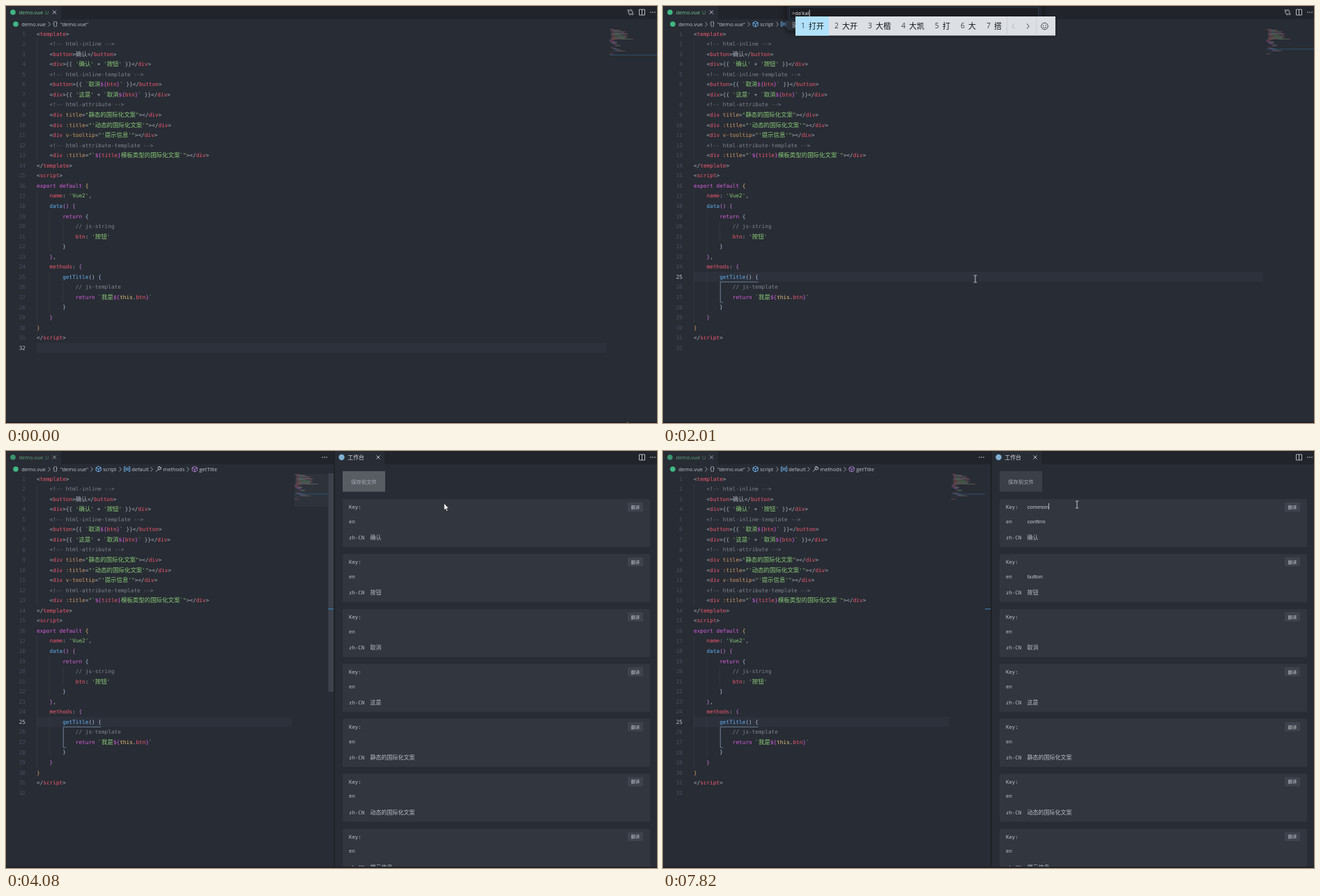
An HTML page for the animation above (8 s loop, 934x599 px).

```html
<!DOCTYPE html>
<html lang="zh-CN">
<head>
<meta charset="utf-8">
<title>demo.vue</title>
<style>
html, body { margin: 0; width: 100%; height: 100%; overflow: hidden; background: #282c34; }
svg { display: block; width: 100%; height: 100%; }
text { white-space: pre; }
.code { font: 7.72px "DejaVu Sans Mono", monospace; }
.code .c { font-size: 8.46px; }
.ui { font: 7.45px "Open Sans", "Noto Sans", sans-serif; }
.ui .c { font-size: 7.9px; }
.brace { font: 9px "Open Sans", "Noto Sans", sans-serif; }
.key { font: 6.3px "Open Sans", "Noto Sans", sans-serif; }
.form { font: 7.35px "DejaVu Sans Mono", monospace; }
.form .c { font-size: 8px; }
.field { font: 7.86px "Liberation Sans", Arial, sans-serif; }
.btn .c { font-size: 7.3px; }
.mini .c { font-size: 6.2px; }
.ime { font: 10.4px "Open Sans", "Noto Sans", sans-serif; }
.ime .c { font-size: 11px; }
.c { font-family: "Noto Sans CJK SC", "Noto Sans CJK", sans-serif; }
</style>
</head>
<body>
<svg id="stage" viewBox="0 0 934 599" preserveAspectRatio="none"></svg>
<script>
const LOOP = 8000, ROW = 14.55, ADV = 4.65, WIDE = 8.46;
const CJK = /([\u3000-\u9fff]+)/;
const INK = {
  w: '#abb2bf', r: '#ef596f', p: '#d55fde', g: '#89ca78', b: '#61afef',
  o: '#d19a66', c: '#7f848e', y: '#e5c07b', v: '#c678dd', l: '#a9bcd8'
};
const stage = document.getElementById('stage');

function el(parent, tag, attrs = {}) {
  const n = document.createElementNS('http://www.w3.org/2000/svg', tag);
  for (const k in attrs) n.setAttribute(k, attrs[k]);
  parent.append(n);
  return n;
}
const set = (n, attrs) => { for (const k in attrs) n.setAttribute(k, attrs[k]); };
const show = (n, on) => n.setAttribute('visibility', on ? 'inherit' : 'hidden');
const group = (parent, x = 0, y = 0) => el(parent, 'g', { transform: `translate(${x} ${y})` });
const rect = (parent, x, y, width, height, fill, more) => el(parent, 'rect', { x, y, width, height, fill, ...more });
const line = (parent, d, stroke, w = 0.8, more) => el(parent, 'path', { d, stroke, 'stroke-width': w, fill: 'none', ...more });
const ring = (parent, cx, cy, r, stroke, w, more) => el(parent, 'circle', { cx, cy, r, fill: 'none', stroke, 'stroke-width': w, ...more });

// Latin and CJK runs use different fonts and sizes
function fill(node, str, color) {
  str.split(CJK).forEach((s, i) => {
    if (!s) return;
    const run = el(node, 'tspan', i % 2 ? { class: 'c' } : {});
    if (color) run.setAttribute('fill', color);
    run.textContent = s;
  });
}
function label(parent, x, y, str, cls, color, more) {
  const n = el(parent, 'text', { x, y: y + 2.7, class: cls, fill: color, ...more });
  fill(n, str);
  return n;
}
function setText(n, str) {
  if (n.shown === str) return;
  n.shown = str;
  n.replaceChildren();
  fill(n, str);
}

const source = [
  '0|w<|rtemplate|w>',
  '1|c<!-- html-inline -->',
  '1|w<|rbutton|w>确认</|rbutton|w>',
  "1|w<|rdiv|w>{{ |g'确认'|w + |g'按钮'|w }}</|rdiv|w>",
  '1|c<!-- html-inline-template -->',
  '1|w<|rbutton|w>{{ |g`取消|p${|rbtn|p}|g`|w }}</|rbutton|w>',
  "1|w<|rdiv|w>{{ |g'这是'|w + |g`取消|p${|rbtn|p}|g`|w }}</|rdiv|w>",
  '1|c<!-- html-attribute -->',
  '1|w<|rdiv |otitle|w=|g"静态的国际化文案"|w></|rdiv|w>',
  '1|w<|rdiv |o:title|w=|g"\'动态的国际化文案\'"|w></|rdiv|w>',
  '1|w<|rdiv |ov-tooltip|w=|g"\'提示信息\'"|w></|rdiv|w>',
  '1|c<!-- html-attribute-template -->',
  '1|w<|rdiv |o:title|w=|g"`|p${|rtitle|p}|g模板类型的国际化文案`"|w></|rdiv|w>',
  '0|w</|rtemplate|w>',
  '0|w<|rscript|w>',
  '0|pexport default |y{',
  "1|rname|w: |g'Vue2'|w,",
  '1|bdata|v() {',
  '2|preturn |l{',
  '3|c// js-string',
  "3|rbtn|w: |g'按钮'",
  '2|l}',
  '1|v}|w,',
  '1|rmethods|w: |v{',
  '2|bgetTitle|l() {',
  '3|c// js-template',
  '3|preturn |g`我是|p${|ythis|w.|rbtn|p}|g`',
  '2|l}',
  '1|v}',
  '0|o}',
  '0|w</|rscript|w>',
  '0|w'
];
const rowY = i => 40 + ROW * i;

// editor
rect(stage, 0, 0, 934, 599, '#282c34');
rect(stage, 79, 0, 855, 19, '#21252b');
const current = rect(stage, 44, 0, 817, ROW, '#2c313c');
const matches = group(stage);
rect(matches, 132, 382.4, 5, 13.6, '#515a6b');
rect(matches, 81, 426, 5, 13.6, '#515a6b');
const code = group(stage), map = group(stage), numbers = [];
const slider = rect(map, 0, 0, 48, 47, '#abb2bf');
source.forEach((src, i) => {
  const [depth, ...parts] = src.split('|'), y = rowY(i), x0 = 44 + depth * 4 * ADV;
  numbers.push(label(code, 28, y, String(i + 1), 'code', '', { 'text-anchor': 'end' }));
  for (let d = 0; d < depth; d++) rect(code, 44 + d * 4 * ADV, y - ROW / 2, 0.6, ROW, '#3b4048');
  const text = el(code, 'text', { x: x0, y: y + 2.6, class: 'code' });
  let mx = depth * 4 * ADV;
  for (const p of parts) {
    const s = p.slice(1), color = INK[p[0]];
    fill(text, s, color);
    if (p[0] === 'c') text.setAttribute('font-style', 'italic');
    const w = [...s].reduce((a, ch) => a + (CJK.test(ch) ? WIDE : ADV), 0);
    if (w) rect(map, mx * 0.137, i * 1.19, w * 0.137, 0.7, color, { opacity: 0.5 });
    mx += w;
  }
});
const mapLine = rect(map, 0, 0, 68, 0.7, '#30618a');
const scope = line(stage, 'M136.5 396.4H82.4V426H86', '#8fa9c8', 0.6);
const caret = rect(stage, 136.7, 382.5, 1, 14, '#528bff');

// tab and breadcrumbs
const cross = (parent, x, y, color) => line(parent, `M${x - 2.5} ${y - 2.5}l5 5m0-5l-5 5`, color, 0.9);
const dots = (parent, x, y) => [-3, 0, 3].forEach(d => el(parent, 'circle', { cx: x + d, cy: y, r: 0.8, fill: '#c5c9d0' }));
const chevron = (parent, x) => line(parent, `M${x - 1.5} 23l3 3.2-3 3.2`, '#aeb5c2', 0.8);
const CUBE = 'M0-4L3.6-2V2L0 4L-3.6 2V-2ZM-3.6-2L0 0L3.6-2M0 0V4';
const FIELD = 'M-2-3.2H-4V3.2H-2M2-3.2H4V3.2H2M-1.8-1.3H1.8V1.3H-1.8Z';
const WRENCH = 'M-3.6 3.6L0.3-.3M3.7-2.4A2.3 2.3 0 1 1 1.9-3.7L1.6-2L3.7-2.4';
const icon = (parent, x, y, d, color) => line(parent, d, color, 0.9, { transform: `translate(${x} ${y})` });
const CRUMB = '#bfc4ce';

const tab = group(stage);
el(tab, 'circle', { cx: 10, cy: 9, r: 3.8, fill: '#41b883' });
label(tab, 18.5, 9.2, 'demo.vue', 'ui', '#73c991');
label(tab, 56, 9.2, 'U', 'ui', '#5da27c');
cross(tab, 69.5, 9, '#d7dae0');

el(stage, 'circle', { cx: 14, cy: 26, r: 3.8, fill: '#41b883' });
label(stage, 22.3, 26.2, 'demo.vue', 'ui', CRUMB);
chevron(stage, 62);
label(stage, 67.3, 26.2, '{}', 'brace', CRUMB);
label(stage, 78, 26.2, '"demo.vue"', 'ui', CRUMB);
const crumbs = group(stage);
[[123, 'script', CUBE, '#75beff'], [164, 'default', FIELD, '#75beff'],
 [209, 'methods', WRENCH, '#c5c9d0'], [261, 'getTitle', CUBE, '#b180d7']].forEach(([x, s, d, color]) => {
  chevron(crumbs, x);
  icon(crumbs, x + 9.7, 26, d, color);
  label(crumbs, x + 16.3, 26.2, s, 'ui', CRUMB);
});

const compare = group(stage, 896, 9);
line(compare, 'M-2.8-1.2V1.5Q-2.8 3 0 3M2.8 1.2V-1.5Q2.8-3 0-3M-1 1.5L.5 3L-1 4.5M1-4.5L-.5-3L1-1.5', '#c5c9d0', 0.8);
ring(compare, -2.8, -2.5, 1.2, '#c5c9d0', 0.8);
ring(compare, 2.8, 2.5, 1.2, '#c5c9d0', 0.8);

// workbench on the right
const bench = group(stage);
rect(bench, 472, 19, 462, 580, '#282c34');
rect(bench, 472, 0, 71, 19, '#282c34');
rect(bench, 470, 0, 2, 599, '#1e2127');
dots(bench, 457, 9);
el(bench, 'circle', { cx: 481.5, cy: 9, r: 4.2, fill: '#7fb0d3' });
label(bench, 490.3, 9.2, '工作台', 'ui', '#d7dae0');
cross(bench, 534, 9, '#d7dae0');
const scroll = rect(bench, 462.5, 32, 7.5, 314, '#8a95a8');
rect(bench, 462, 226.4, 8, 1.1, '#3d82b8');

const page = group(bench), hovers = [], answers = [];
rect(page, 483, 29, 61, 29.5, '#3b3f48');
const saveHover = rect(page, 483, 29, 61, 29.5, '#ffffff');
label(page, 513.5, 44, '保存到文件', 'ui btn', '#a9aeb7', { 'text-anchor': 'middle' });
['确认', '按钮', '取消', '这是', '静态的国际化文案', '动态的国际化文案', '提示信息'].forEach((word, i) => {
  const y = 69 + 78.95 * i;
  rect(page, 483, y, 441, 69, '#32363f', { rx: 1.5 });
  label(page, 492, y + 11.5, 'Key:', 'form', '#b9bec7');
  label(page, 492, y + 32, 'en', 'form', '#b9bec7');
  label(page, 492, y + 55.3, 'zh-CN', 'form', '#b9bec7');
  label(page, 522.5, y + 55.3, word, 'form', '#b9bec7');
  answers.push(label(page, 522.7, y + 32, '', 'field', '#c5c9d0'));
  rect(page, 892, y + 4.7, 22, 13.2, '#3e434d', { rx: 1 });
  hovers.push(rect(page, 892, y + 4.7, 22, 13.2, '#5c616a', { rx: 1 }));
  label(page, 903, y + 11, '翻译', 'ui mini', '#c0c4cc', { 'text-anchor': 'middle' });
});
const keyField = label(page, 522.7, 80, '', 'field', '#c5c9d0');
const keyCaret = rect(page, 523, 75, 0.8, 9, '#d7dae0');

line(stage, 'M908.5 5h8v8h-8zM912.5 5v8', '#c5c9d0', 0.9);
dots(stage, 928, 9);
rect(stage, 0, 597, 934, 2, '#1f2329');

// command palette
const palette = group(stage);
const panel = rect(palette, 177.5, -4, 366.5, 40, '#21252b', { style: 'filter:drop-shadow(0 1px 4px #0009)' });
rect(palette, 181.5, 2, 357, 16, '#1b1d23', { stroke: '#28405a', 'stroke-width': 0.7 });
const input = label(palette, 185, 10.3, '', 'ui', '#dfe2e7');
const inputCaret = rect(palette, 190, 5.5, 0.8, 9.5, '#e6e8ec');
rect(palette, 178, 20.5, 358, 13.4, '#2c313a');
const single = label(palette, 185, 27.3, '', 'ui', '#dfe2e7');

const list = group(palette);
const KEYW = { Ctrl: 16, Shift: 19, I: 8 };
function chord(y, keys) {
  let x = 531;
  keys.split(' ').reverse().forEach(combo => {
    combo.split('+').reverse().forEach((k, i) => {
      const w = KEYW[k] || 10.5;
      if (i) {
        label(list, x - 4.5, y, '+', 'key', '#c5c9d0', { 'text-anchor': 'middle' });
        x -= 9;
      }
      x -= w;
      rect(list, x, y - 5, w, 10, '#2c3038', { rx: 1.5 });
      label(list, x + w / 2, y - 0.3, k, 'key', '#dfe2e7', { 'text-anchor': 'middle' });
    });
    x -= 7;
  });
}
['打开翻译工作台', '开发人员: 重新加载窗口|Ctrl+R', '-Developer: Reload Window', '替换当前文档', '手动设置语言目录',
 'ESLint: Fix all auto-fixable Problems', '搜索: 在文件中替换|Ctrl+Shift+H', '-Search: Replace in Files',
 'VSCodeCounter: Count lines in directory', 'ESLint: Migrate Settings',
 '文件: 保存但不格式化|Ctrl+K Ctrl+Shift+S', '-File: Save without Formatting',
 '开发人员: 切换开发人员工具|Ctrl+Shift+I', '-Developer: Toggle Developer Tools',
 '"文件操作需要预览"的重置选项', '按降序排列行', '-Sort Lines Descending', '按升序排列行'].forEach((row, i) => {
  const y = 27.3 + 13.34 * i, [s, keys] = row.split('|'), sub = s[0] === '-';
  label(list, 185, y, sub ? s.slice(1) : s, 'ui', sub ? '#a4a8b0' : '#dfe2e7');
  if (keys) chord(y, keys);
});
rect(list, 178, 207.3, 366, 0.7, '#3e4452');
label(list, 499.5, 214.5, '其他命令', 'ui', '#3f9bf5');
rect(list, 536, 20.5, 6, 13.5, '#3a404b');
ring(list, 527.5, 27.3, 2.8, '#c5c9d0', 1);
ring(list, 527.5, 27.3, 3.9, '#c5c9d0', 1, { 'stroke-dasharray': '1.5 1.56' });
el(list, 'circle', { cx: 527.5, cy: 27.3, r: 1, fill: '#c5c9d0' });

// input method bar
const ime = group(stage);
function drawIme(words, x0) {
  if (ime.shown === words) return;
  ime.shown = words;
  ime.replaceChildren();
  if (!words) return;
  const items = words.split(' ');
  const width = w => 26 + 11 * w.length;
  const end = items.reduce((x, w) => x + width(w), x0);
  rect(ime, x0, 15, end + 70 - x0, 27.5, '#dcdfe4', { style: 'filter:drop-shadow(0 1px 1.5px #0006)' });
  rect(ime, x0, 15, width(items[0]), 27.5, '#b1e1fb');
  let x = x0;
  items.forEach((w, i) => {
    label(ime, x + 8, 29.7, String(i + 1), 'ime', '#3d4148');
    label(ime, x + 19, 29.9, w, 'ime', '#15171a');
    x += width(w);
  });
  for (const d of [0, 42]) rect(ime, end + d, 15, 0.7, 27.5, '#c4c8cd');
  line(ime, `M${end + 11} 25.3l-3.2 3.7 3.2 3.7`, '#a9adb3', 0.9);
  line(ime, `M${end + 29} 25.3l3.2 3.7-3.2 3.7`, '#33373d', 0.9);
  const face = group(ime, end + 54.5, 29);
  ring(face, 0, 0, 4.8, '#33373d', 0.9);
  line(face, 'M-2.5 1.2Q0 4 2.5 1.2', '#33373d', 0.9);
  for (const d of [-1.7, 1.7]) el(face, 'circle', { cx: d, cy: -1.3, r: 0.7, fill: '#33373d' });
}

// pointers
const arrow = group(stage), beam = group(stage), hand = group(stage);
el(arrow, 'path', { d: 'M0 0V10L2.3 8L3.8 11.4L5.4 10.7L3.9 7.4H7Z', fill: '#fff', stroke: '#111', 'stroke-width': 0.6 });
line(beam, 'M-2.2-5H-.6L0-4.5L.6-5H2.2M0-4.5V4.5M-2.2 5H-.6L0 4.5L.6 5H2.2', '#d7dae0', 0.9);
el(hand, 'path', {
  d: 'M-1 0Q0-1 1 0V4Q2 3.3 2.8 4.2Q3.8 3.7 4.4 4.7Q5.4 4.5 5.6 5.6V8.5Q5 10.5 4.4 12H-1L-4 7.6Q-4 6-2.5 6.6L-1 8Z',
  fill: '#fff', stroke: '#111', 'stroke-width': 0.6
});
const path = [
  [30, 891, 597], [270, 448, 392], [3600, 448, 392], [3970, 360, 215], [4030, 505, 50], [4080, 628, 75],
  [4400, 760, 70], [4780, 905, 78], [4960, 905, 78], [5240, 907, 160], [5620, 907, 160], [6120, 612, 79], [6230, 594, 77]
];
function pointerAt(t) {
  const i = path.findIndex(p => p[0] > t);
  if (i < 0) return path[path.length - 1].slice(1);
  if (!i) return path[0].slice(1);
  const [t0, x0, y0] = path[i - 1], [t1, x1, y1] = path[i];
  const k = (t - t0) / (t1 - t0);
  return [x0 + (x1 - x0) * k, y0 + (y1 - y0) * k];
}

const EMPTY = '没有匹配的命令', FOUND = '打开翻译工作台';
const ONE = '的 都 对 等 到 但 点', OPEN = '打开 大开 大楷 大凯 打 大 搭';
const TURN = '翻译 反义 犯意 繁漪 泛艺 犯疑 范怡';
// time, input, candidates, single result (blank shows the full list)
const typing = [
  [0, '>', '', ''], [1620, '>', ONE, ''], [1650, '>d', ONE, EMPTY],
  [1710, '>da', '大 打 达 搭 答 哒 嗒', EMPTY], [1800, ">da'k", '打开 大口 大块 大考 大课 打卡 大客', EMPTY],
  [1880, ">da'ka", '打卡 大咖 大卡 打开 大 打 达', EMPTY], [1950, ">da'kai", OPEN, EMPTY], [2400, '>打开', '', FOUND],
  [2600, '>打开f', '发 放 分 飞 服 副 法', EMPTY], [2630, '>打开fa', '发 法 罚 乏 伐 阀 筏', EMPTY],
  [2650, '>打开fan', '反 饭 翻 范 烦 犯 凡', EMPTY], [2670, ">打开fan'y", TURN, EMPTY],
  [2700, ">打开fan'yi", TURN, EMPTY], [2830, '>打开翻译', '', FOUND]
];
const keyTimes = [7080, 7210, 7420, 7590, 7700, 7820];
const latest = (list, t) => list.filter(s => s[0] <= t).pop();
const fade = (t, a, b) => Math.max(0, Math.min(1, (b - t) / (b - a)));

function draw(t) {
  const clicked = t >= 300, split = t >= 3300, open = t >= 1360 && t < 3190;
  const active = clicked ? 24 : 31;

  numbers.forEach((n, i) => n.setAttribute('fill', i === active ? '#c0c6d1' : '#495162'));
  set(current, { y: rowY(active) - ROW / 2, width: split ? 366 : 817 });
  set(map, { transform: `translate(${split ? 414 : 866} 33)` });
  set(mapLine, { y: active * 1.19, width: split ? 48 : 68 });
  show(scope, clicked);
  show(matches, clicked && t < 1360);
  show(caret, (clicked && t < 810) || (t >= 1310 && t < 1360));
  show(crumbs, t >= 470);
  show(compare, !split);
  set(tab, { opacity: split ? 0.75 : 1 });

  show(bench, split);
  show(page, t >= 3700);
  const hover = t < 3900 ? 0 : fade(t, 4100, 4600);
  set(slider, { opacity: 0.045 * hover });
  set(scroll, { opacity: 0.2 * hover });
  set(saveHover, { opacity: t < 4010 ? 0 : 0.15 * fade(t, 4100, 4300) });
  setText(answers[0], t >= 5080 ? 'confirm' : '');
  setText(answers[1], t >= 5700 ? 'button' : '');
  const typed = 'common'.slice(0, keyTimes.filter(k => k <= t).length);
  setText(keyField, typed);
  show(keyCaret, split && t >= 6140 && !(t >= 6670 && t < 7080));
  set(keyCaret, { x: 522.9 + (typed ? keyField.getComputedTextLength() : 0) });

  show(palette, open);
  const [, text, words, result] = latest(typing, t);
  const full = !result && t >= 1390;
  setText(input, text);
  setText(single, result);
  show(list, open && full);
  set(panel, { height: full ? 268 : 40 });
  set(inputCaret, { x: 185.3 + input.getComputedTextLength() });
  drawIme(open ? words : '', t < 2500 ? 190 : 206);

  const [x, y] = pointerAt(t);
  const over = [0, 1].find(i => Math.abs(x - 903) < 11 && Math.abs(y - 80.3 - 78.95 * i) < 6.6);
  hovers.forEach((h, i) => show(h, split && t >= 3700 && i === over));
  const kind = over !== undefined && split ? hand
    : t >= 6100 || (t < 3970 && x < 861 && y > 33) ? beam : arrow;
  for (const p of [arrow, beam, hand]) {
    show(p, p === kind);
    set(p, { transform: `translate(${x} ${y})` });
  }
}

function tick() {
  draw(performance.now() % LOOP);
  requestAnimationFrame(tick);
}
tick();
</script>
</body>
</html>
```
